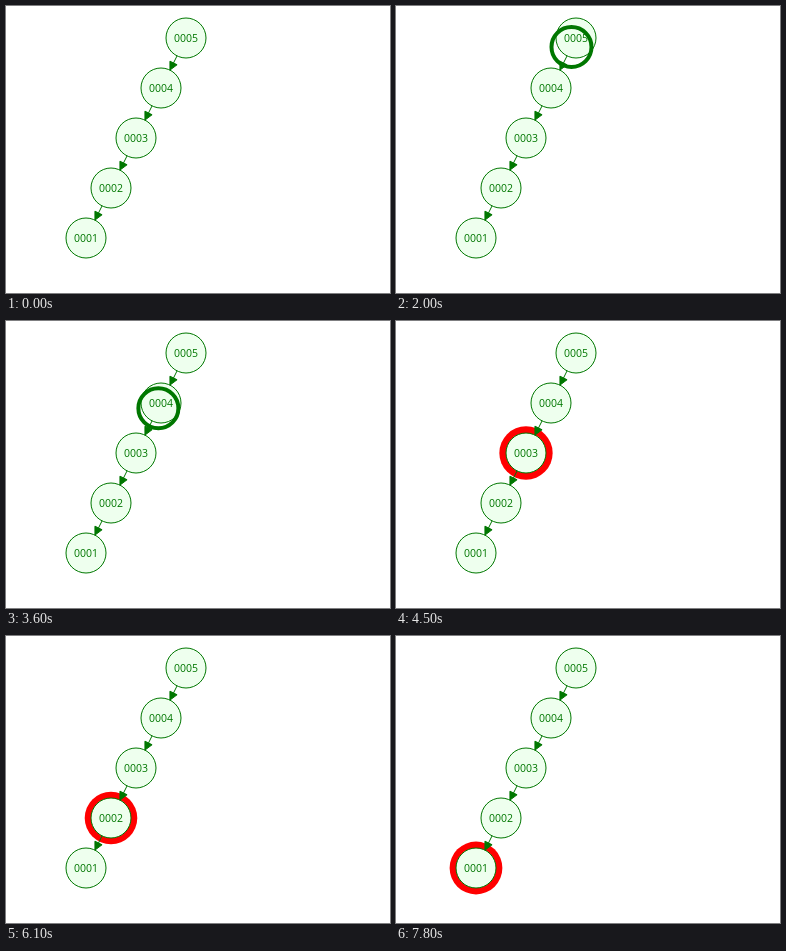
Animation of 384x287 px, one loop 8 s. Source, as an HTML page:

```html
<!DOCTYPE html>
<html lang="en">
<head>
<meta charset="utf-8">
<title>Tree search</title>
<style>
  html, body { margin: 0; width: 100%; height: 100%; overflow: hidden; background: #fff; }
  svg { display: block; width: 100vw; height: 100vh; }
  .node { fill: #efe; stroke: #070; }
  .edge { fill: #070; stroke: #070; }
  .ring { fill: none; stroke: #070; stroke-width: 4; }
  .halo { fill: #f00; }
  text { font: 10.5px "Open Sans", "Noto Sans", sans-serif; fill: #070; text-anchor: middle; }
</style>
</head>
<body>
<svg id="stage" viewBox="0 0 384 287"></svg>
<script>
const LOOP = 8000, TICK = 100, LAST = 7800, R = 20;
const stage = document.getElementById('stage');
const nodes = [5, 4, 3, 2, 1].map((n, i) => ({ label: '000' + n, x: 180 - 25 * i, y: 32 + 50 * i }));

// [start, end] of each walk from a node to its child
const walks = [[1854, 2664], [3515, 4325], [5134, 5944], [6819, 7399]];

function add(tag, attrs, text) {
  const el = document.createElementNS('http://www.w3.org/2000/svg', tag);
  set(el, attrs);
  if (text) el.textContent = text;
  return stage.appendChild(el);
}

function set(el, attrs) {
  for (const key in attrs) el.setAttribute(key, attrs[key]);
}

function addEdge(a, b) {
  const d = Math.hypot(b.x - a.x, b.y - a.y);
  const ux = (b.x - a.x) / d, uy = (b.y - a.y) / d;
  // point `along` the edge, `side` pixels off it
  const at = (along, side) =>
    (a.x + ux * along - uy * side).toFixed(2) + ' ' + (a.y + uy * along + ux * side).toFixed(2);
  const tip = d - R, base = tip - 8;
  add('path', {
    class: 'edge',
    d: `M${at(R, 0)}L${at(tip, 0)}M${at(tip, 0)}L${at(base, 4)}L${at(base, -4)}Z`
  });
}

const halo = add('circle', { class: 'halo' });
for (const { x, y, label } of nodes) {
  add('circle', { class: 'node', cx: x, cy: y, r: R });
  add('text', { x, y: y + 3.6 }, label);
}
const ring = add('circle', { class: 'ring', r: R });
nodes.slice(1).forEach((n, i) => addEdge(nodes[i], n));

// Triangle wave between 23 and 27, held until the search starts
function haloRadius(t) {
  if (t < 1150) return 26;
  const phase = (t - 1210 + 1680) % 1680;
  const wave = 23 + Math.abs(phase - 840) / 210;
  return Math.min(wave, 26 + (t - 1150) / 210);
}

function draw(t) {
  const walk = walks.findIndex(([start, end]) => t >= start && t <= end + 1);
  const walking = walk >= 0;
  ring.style.display = walking ? '' : 'none';
  halo.style.display = walking || t < 100 ? 'none' : '';
  if (walking) {
    const [start, end] = walks[walk];
    const f = Math.min(1, (t - start) / (end - start));
    const { x, y } = nodes[walk];
    set(ring, { cx: x - 25 * f, cy: y + 50 * f });
  } else {
    const { x, y } = nodes[walks.filter(w => t > w[1]).length];
    set(halo, { cx: x, cy: y, r: haloRadius(t) });
  }
}

const t0 = performance.now();
function tick() {
  const t = (performance.now() - t0) % LOOP;
  draw(Math.min(LAST, Math.floor(t / TICK) * TICK));
  requestAnimationFrame(tick);
}
tick();
</script>
</body>
</html>
```
